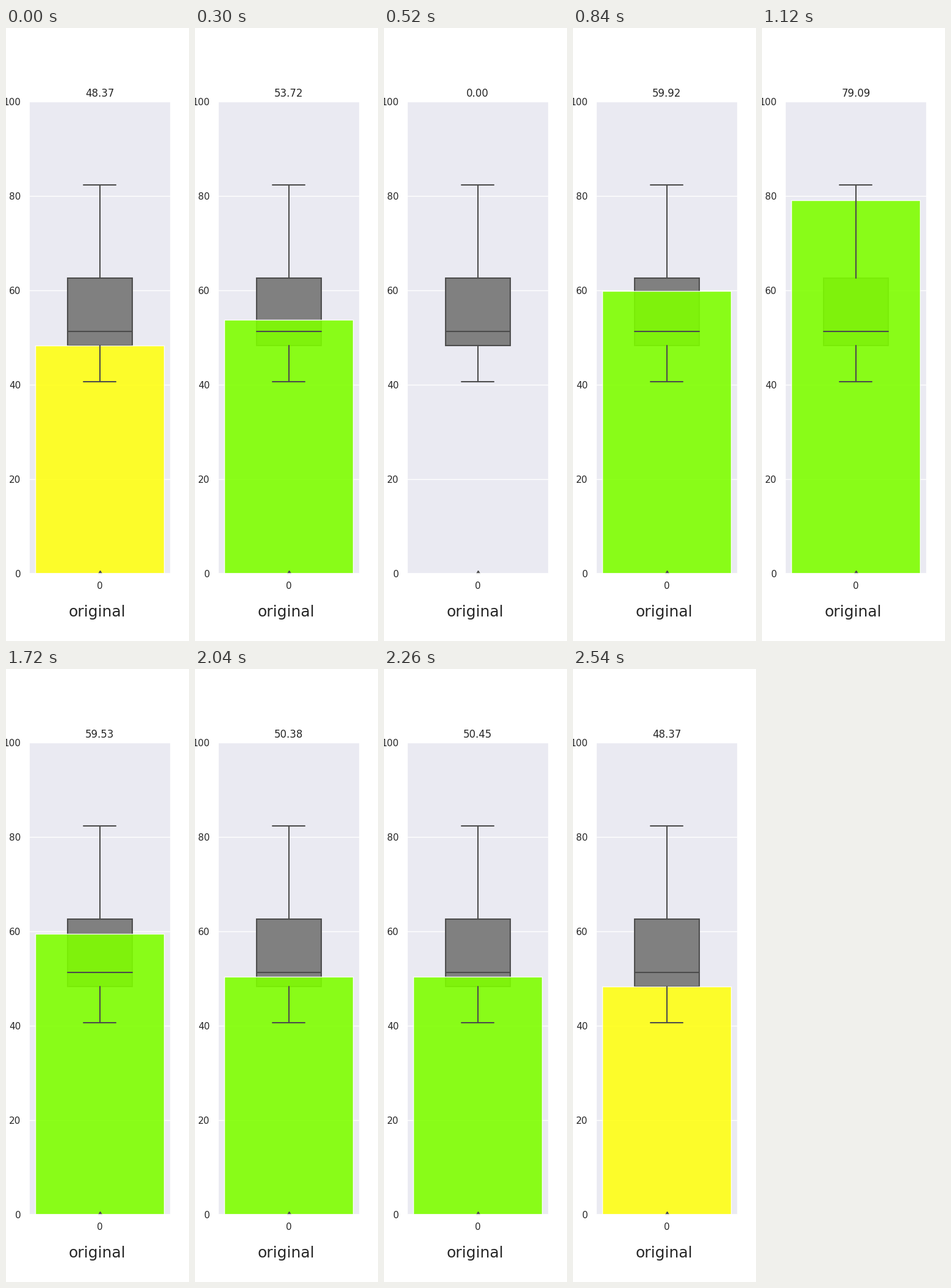
Write a matplotlib script that moves like this. It is 300 by 1000 pixels and loops after 2.56 s.

```python
import matplotlib.pyplot as plt
import numpy as np
from matplotlib.animation import FuncAnimation
from matplotlib.patches import Rectangle

TICKS = 128
INTERVAL = 20
INK = "#262626"
LINE = "#4c4c4c"
LOW, Q1, MEDIAN, Q3, HIGH = 40.63, 48.34, 51.31, 62.60, 82.30

# Turning points of the reading as (step, level); straight runs in between.
TURNS = [(0, 48.37), (3, LOW), (7, 53.72), (11, 47.64), (13, 50.38), (14, 0),
         (15, 48.14), (21, 59.53), (22, 59.92), (29, 82.28), (31, 80.87)]

plt.rcParams["font.family"] = "DejaVu Sans"
fig = plt.figure(figsize=(3, 10), dpi=100, facecolor="white")
ax = fig.add_axes([0.125, 0.11, 0.775, 0.77], facecolor="#eaeaf2")
ax.set(xlim=(-0.44, 0.44), ylim=(0, 100), xticks=[0], yticks=range(0, 101, 20))
ax.set_axisbelow(True)
ax.grid(axis="y", color="white", lw=1)
ax.tick_params(length=0, pad=9.5, labelsize=11, labelcolor=INK)
for spine in ax.spines.values():
    spine.set(color="white", linewidth=1.25)
title = ax.set_title("", fontsize=12, color=INK, pad=6)
fig.text(0.497, 0.04, "original", ha="center", fontsize=18, color=INK)


def stroke(xs, ys):
    ax.plot(xs, ys, color=LINE, lw=1.5, zorder=2, solid_capstyle="round")


# The translucent bar lies over the box but under its whiskers and median.
ax.add_patch(Rectangle((-0.2, Q1), 0.4, Q3 - Q1, fc="#808080", ec=LINE,
                       lw=1.5, zorder=1))
bar = ax.add_patch(Rectangle((-0.4, 0), 0.8, 0, ec="white", lw=1,
                             alpha=0.9, zorder=1.5))
for inner, outer in ((Q1, LOW), (Q3, HIGH)):
    stroke([0, 0], [inner, outer])
    stroke([-0.1, 0.1], [outer, outer])
stroke([-0.2, 0.2], [MEDIAN, MEDIAN])
ax.plot([0], [0], "d", color=LINE, ms=5, zorder=2)


def level_at(tick):
    """Play forward then back, four steps per group with a rest on the third."""
    group, phase = divmod(min(tick, TICKS - 1 - tick), 8)
    step = 4 * group + min(phase, 2) + phase // 7
    return np.interp(step, *zip(*TURNS))


def update(tick):
    level = level_at(tick)
    bar.set_height(level)
    bar.set_facecolor("chartreuse" if level >= 50 else "xkcd:yellow")
    title.set_text(f"{level:.2f}")
    return bar, title


anim = FuncAnimation(fig, update, frames=TICKS, interval=INTERVAL,
                     repeat=True, repeat_delay=0, blit=False)
plt.show()
```
